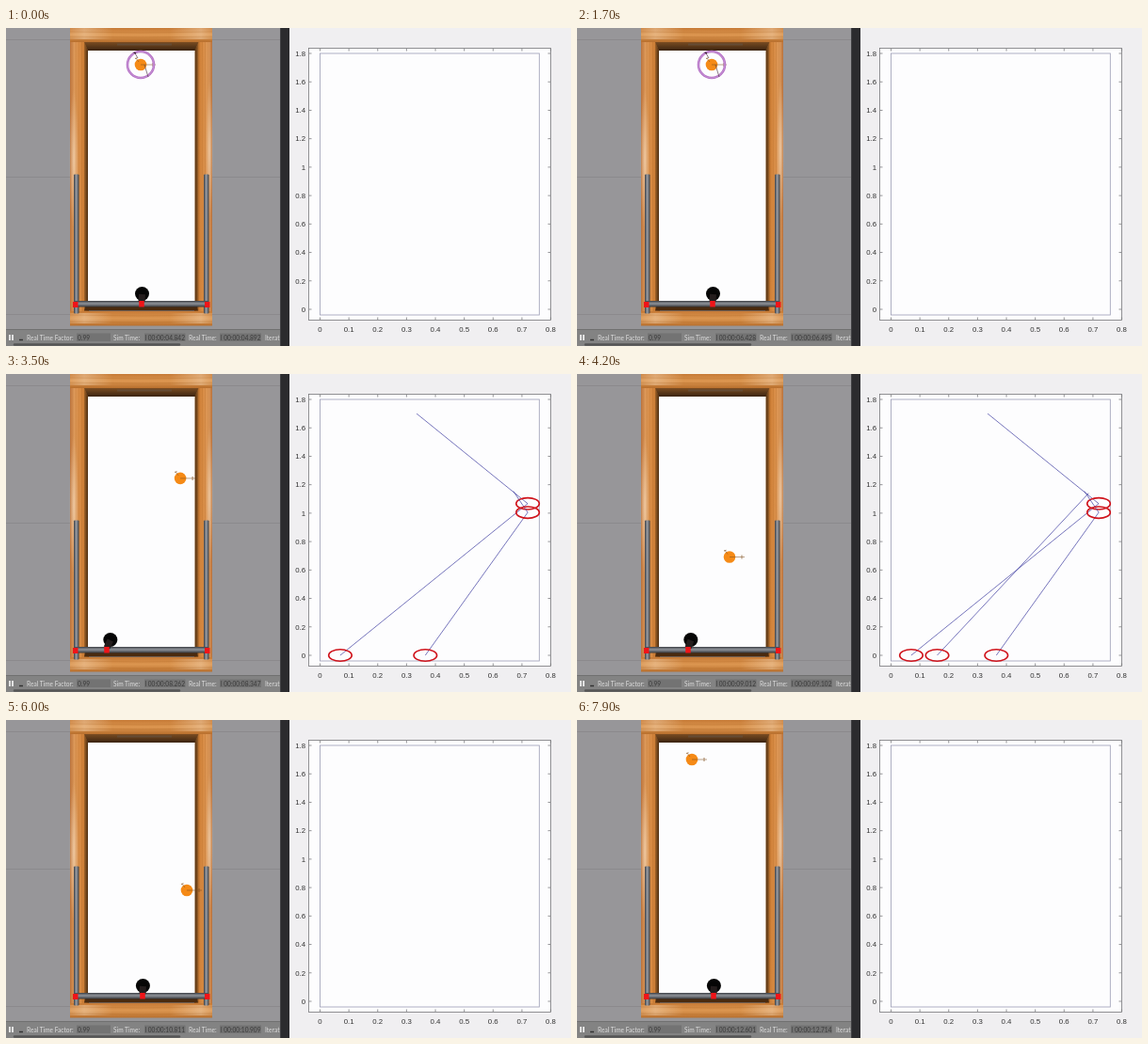
An HTML page for the animation above (8000 ms loop, 600x338 px).

```html
<!DOCTYPE html>
<html lang="en">
<head>
<meta charset="utf-8">
<title>Air hockey simulation</title>
<style>
html, body { margin: 0; width: 100%; height: 100%; overflow: hidden; background: #979699; }
svg { display: block; width: 600px; height: 338px; }
.ui { font: 6.6px Lato, sans-serif; fill: #dcdcdc; }
.ui .field { fill: #3b3b3b; }
.tick { font: 7.8px "Liberation Sans", Arial, sans-serif; fill: #333; }
.trace { fill: none; stroke: #4a48a6; stroke-width: .75; }
.mark { fill: none; stroke: #d0141c; stroke-width: 1.6; }
</style>
</head>
<body>
<svg viewBox="0 0 600 338">
  <defs>
    <linearGradient id="side">
      <stop offset="0" stop-color="#b9713a"/><stop offset=".2" stop-color="#dd9a5c"/>
      <stop offset=".5" stop-color="#d98d46"/><stop offset=".75" stop-color="#cc7d35"/>
      <stop offset="1" stop-color="#9a5a20"/>
    </linearGradient>
    <linearGradient id="side2" href="#side" x1="1" x2="0"/>
    <linearGradient id="end" x2="0" y2="1">
      <stop offset="0" stop-color="#c67a36"/><stop offset=".5" stop-color="#dc9650"/>
      <stop offset="1" stop-color="#b86f2d"/>
    </linearGradient>
    <linearGradient id="sheen">
      <stop offset="0" stop-color="#f6d9b8" stop-opacity=".15"/><stop offset=".1" stop-color="#f6d9b8" stop-opacity=".45"/>
      <stop offset=".3" stop-color="#f6d9b8" stop-opacity="0"/><stop offset=".7" stop-color="#f6d9b8" stop-opacity="0"/>
      <stop offset=".92" stop-color="#f6d9b8" stop-opacity=".45"/><stop offset="1" stop-color="#f6d9b8" stop-opacity=".15"/>
    </linearGradient>
    <linearGradient id="shade"><stop offset="0" stop-color="#a5662a"/><stop offset="1" stop-color="#4a2c10"/></linearGradient>
    <linearGradient id="shade2" href="#shade" x1="1" x2="0"/>
    <linearGradient id="lip" x2="0" y2="1"><stop offset="0" stop-color="#7a4c22"/><stop offset="1" stop-color="#3b2410"/></linearGradient>
    <linearGradient id="rod">
      <stop offset="0" stop-color="#3d4046"/><stop offset=".5" stop-color="#9a9ea5"/><stop offset="1" stop-color="#3a3c41"/>
    </linearGradient>
    <linearGradient id="bar" x2="0" y2="1">
      <stop offset="0" stop-color="#3d4046"/><stop offset=".45" stop-color="#8f939a"/><stop offset="1" stop-color="#36383c"/>
    </linearGradient>
    <radialGradient id="glow"><stop offset="0" stop-color="#f8e0c4" stop-opacity=".65"/><stop offset="1" stop-color="#f8e0c4" stop-opacity="0"/></radialGradient>
  </defs>

  <rect width="291" height="320" fill="#979699"/>
  <path d="M0 12.5H291M0 158.5H291M0 304.5H291" stroke="#88878a" stroke-width=".8"/>

  <rect x="68" width="20" height="316" fill="url(#side)"/>
  <rect x="200" width="19" height="316" fill="url(#side2)"/>
  <rect x="68" width="151" height="15" fill="url(#end)"/>
  <rect x="68" y="301" width="151" height="15.500" fill="url(#end)"/>
  <path d="M68 0H219V12H68zM68 303H219V314H68z" fill="url(#sheen)"/>
  <g id="grain" fill="none" stroke="#a5601f" stroke-width=".6" opacity=".35"/>
  <ellipse cx="72" cy="140" rx="5" ry="75" fill="url(#glow)"/>
  <ellipse cx="216" cy="130" rx="4" ry="75" fill="url(#glow)"/>
  <path d="M83 15L87 24V290L83 301Z" fill="url(#shade)"/>
  <path d="M204.500 15L200.500 24V290L204.500 301Z" fill="url(#shade2)"/>
  <path d="M83 15H204.500L200.500 24H87Z" fill="url(#lip)"/>
  <path d="M118 17.500H176" stroke="#62564b" stroke-width="2" opacity=".5"/>
  <path d="M86 290H202L204 300.500H83Z" fill="#4a2a0f"/>
  <rect x="87" y="24" width="113.500" height="267" fill="#fdfdfe"/>

  <rect x="72" y="155.500" width="5.500" height="148" rx="1" fill="url(#rod)"/>
  <rect x="210" y="155.500" width="5.500" height="148" rx="1" fill="url(#rod)"/>
  <rect x="73" y="290" width="142" height="6.500" fill="url(#bar)"/>
  <path d="M71 291h5.500v6H71zM211 291h5.500v6H211z" fill="#f01418"/>

  <g id="mallet"><circle cy="282.500" r="7.500" fill="#060606"/></g>
  <path id="stem" stroke="#241d1d" stroke-width="7"/>
  <rect id="grip" y="290" width="5.500" height="6.500" fill="#f01418"/>

  <g id="puck">
    <circle r="6.300" fill="#f58a16"/>
    <g fill="none" stroke="#80501f" opacity=".75">
      <path d="M-5 -7L-2 -3M0 0H16" stroke-width=".7"/>
      <path d="M-6 -6.500l2.500 -.7M13 -2v4" stroke-width="1"/>
    </g>
    <g id="ring" fill="none">
      <circle r="14" stroke="#b573c6" stroke-width="2.600"/>
      <circle r="14" stroke="#cf9fda" stroke-width=".7"/>
      <path d="M-6.500 -13L-3 -7M4 0L8 13" stroke="#5a4650" stroke-width=".7"/>
      <path d="M-7.500 -13l2.500 .8" stroke="#3c2c34" stroke-width="1.300"/>
    </g>
  </g>

  <rect y="320" width="291" height="18" fill="#838383"/>
  <path d="M0 320.500H291" stroke="#707070"/>
  <path d="M75 324.500h36v8.500H75zM147 324.500h43.500v8.500H147zM227 324.500h44v8.500H227z" fill="#737373"/>
  <path d="M4 326v6M7 326v6" stroke="#f2f2f2" stroke-width="1.700"/>
  <path d="M14 331.500h4" stroke="#333" stroke-width="1.500"/>
  <path d="M9 336.500H184" stroke="#555" stroke-width="2.400" stroke-linecap="round"/>
  <g class="ui">
    <text x="22" y="332">Real Time Factor:</text><text class="field" x="76" y="332">0.99</text>
    <text x="114" y="332">Sim Time:</text><text class="field" id="sim" x="147.500" y="332"/>
    <text x="194" y="332">Real Time:</text><text class="field" id="real" x="228" y="332"/>
    <text x="275" y="332">Iterat</text>
  </g>

  <rect x="291" width="10" height="338" fill="#2b2b2e"/>
  <path d="M291.500 0V338" stroke="#414144"/>
  <rect x="301" width="299" height="338" fill="#f0eff1"/>
  <rect x="321.500" y="21.500" width="257" height="289" fill="#fdfdfe" stroke="#77777a" stroke-width=".8"/>
  <rect x="333.500" y="27" width="232.800" height="278" fill="none" stroke="#9b9cb4" stroke-width=".8"/>
  <g id="axes" stroke-width=".8"/>
  <g id="plot"/>
</svg>
<script>
const LOOP = 8000, STEP = 100;
const $ = id => document.getElementById(id);
const px = x => 333.5 + x * 306.3;
const py = y => 299 - y * 151.1;

function add(parent, tag, attrs, text) {
  const el = document.createElementNS("http://www.w3.org/2000/svg", tag);
  for (const k in attrs) el.setAttribute(k, attrs[k]);
  if (text) el.textContent = text;
  parent.append(el);
  return el;
}

// wood grain
for (let i = 0; i < 8; i++) {
  const x = (i < 4 ? 71 : 193) + i * 3.1, w = Math.sin(i * 9) * 1.2;
  add($("grain"), "path", { d: `M${x} 15C${x + w} 100 ${x - w} 210 ${x + w} 301` });
}
for (const y of [4, 9, 305, 312])
  add($("grain"), "path", { d: `M68 ${y}Q143 ${y + 2} 219 ${y}` });

// axis ticks and labels
const num = v => String(+v.toFixed(1));
for (let i = 0; i <= 8; i++) {
  const x = px(i / 10);
  add($("axes"), "path", { d: `M${x} 310v-2.5M${x} 22v2.5`, stroke: "#77777a" });
  add($("axes"), "text", { x, y: 323, class: "tick", "text-anchor": "middle" }, num(i / 10));
}
for (let i = 0; i <= 9; i++) {
  const y = py(i / 5);
  add($("axes"), "path", { d: `M322 ${y}h2.5M578 ${y}h-2.5`, stroke: "#77777a" });
  add($("axes"), "text", { x: 318, y: y + 2.8, class: "tick", "text-anchor": "end" }, num(i / 5));
}

// predicted paths: start time, then points; all but the first point are circled
const CLEAR = 5200;
const predictions = [
  [2800, [[.335, 1.7], [.72, 1.067], [.07, 0]]],
  [3500, [[.67, 1.155], [.72, 1.005], [.365, 0]]],
  [3700, [[.685, 1.14], [.16, 0]]]
].map(([start, pts]) => {
  const g = add($("plot"), "g", {});
  const at = pts.map(([x, y]) => [px(x), py(y)]);
  add(g, "polyline", { points: at.join(" "), class: "trace" });
  for (const [cx, cy] of at.slice(1))
    add(g, "ellipse", { cx, cy, rx: 12.3, ry: 6.2, class: "mark" });
  return { g, start };
});

const puckPath = [
  [0, 143, 39], [2800, 143, 39], [2900, 150.5, 50.5], [3620, 192, 123], [4200, 162, 194.5],
  [4860, 127, 271], [5000, 135.5, 260], [6000, 192, 181], [7900, 122, 42]
];
const gripPath = [
  [0, 144], [2800, 144], [2900, 123], [3000, 107], [3500, 107], [3600, 118],
  [4860, 118], [5000, 143], [5200, 145], [7900, 145]
];
const clocks = [
  [0, 4.842, 4.892], [1700, 6.428, 6.495], [2900, 7.619, 7.699], [4200, 9.012, 9.102],
  [5000, 9.812, 9.906], [6000, 10.811, 10.909], [7900, 12.601, 12.714]
];

function sample(table, t) {
  let i = 0;
  while (i < table.length - 2 && t >= table[i + 1][0]) i++;
  const [a, b] = [table[i], table[i + 1]];
  const f = Math.min(1, (t - a[0]) / (b[0] - a[0]));
  return a.slice(1).map((v, k) => v + (b[k + 1] - v) * f);
}

const clock = s => "l 00:00:" + s.toFixed(3).padStart(6, "0");

function draw(t) {
  const [x, y] = sample(puckPath, t);
  $("puck").setAttribute("transform", `translate(${x} ${y})`);
  $("ring").style.display = t < 3200 ? "" : "none";

  const [grip] = sample(gripPath, t);
  const head = 144.5 + (grip - 144) * .91;
  $("mallet").setAttribute("transform", `translate(${head} 0)`);
  $("stem").setAttribute("d", `M${head} 283L${grip} 291`);
  $("grip").setAttribute("x", grip - 2.75);

  const [sim, real] = sample(clocks, t);
  $("sim").textContent = clock(sim);
  $("real").textContent = clock(real);

  for (const { g, start } of predictions)
    g.style.display = t >= start && t < CLEAR ? "" : "none";
}

const origin = performance.now();
function tick() {
  const t = (performance.now() - origin) % LOOP;
  draw(Math.floor(t / STEP) * STEP);
  requestAnimationFrame(tick);
}
tick();
</script>
</body>
</html>
```
